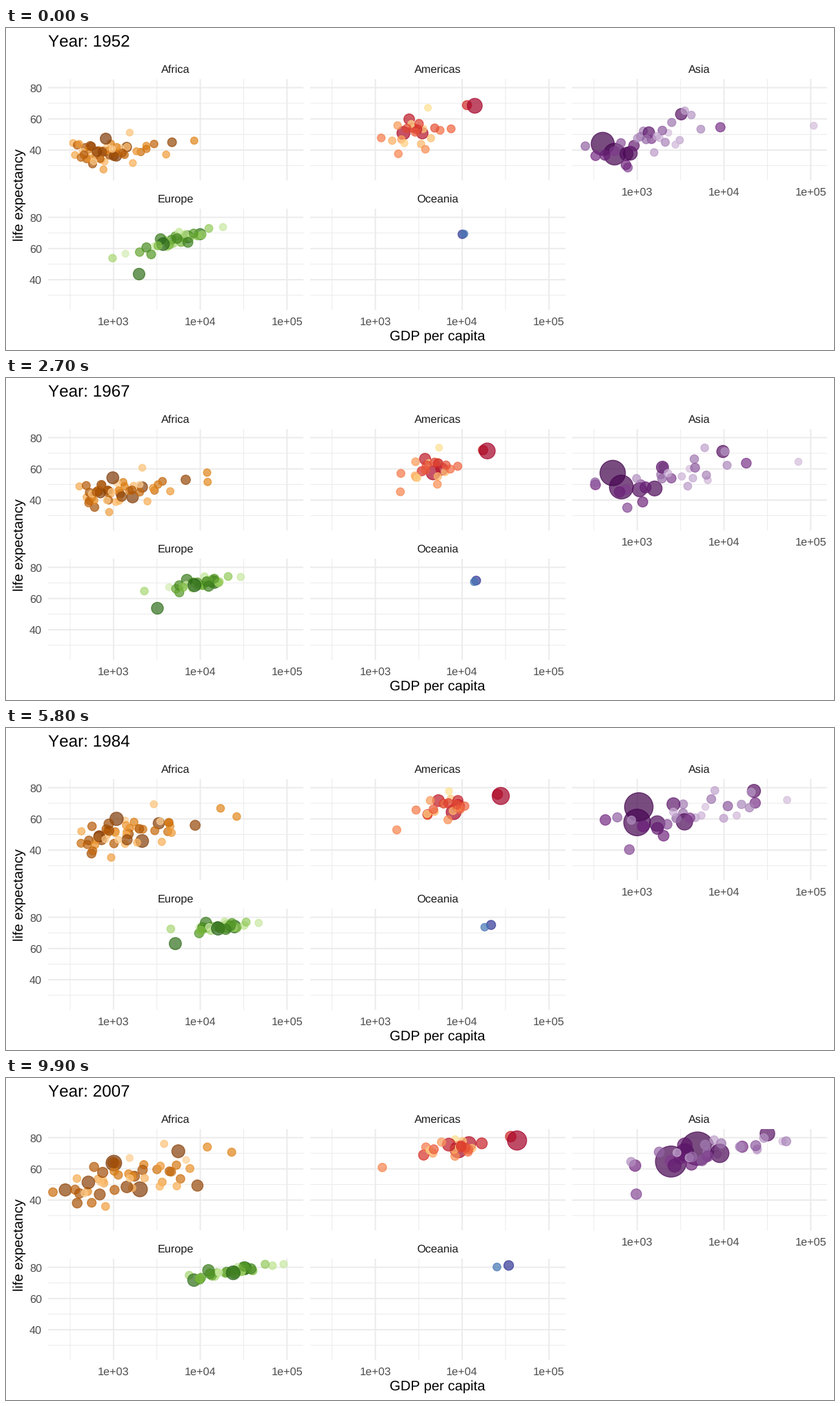
Write a matplotlib script that moves like this. It is 1200x467 px and loops after 10000 ms.

```python
import numpy as np
import matplotlib.pyplot as plt
from matplotlib.animation import FuncAnimation
from matplotlib.colors import LinearSegmentedColormap, to_rgba

W, H, DPI = 1200, 467, 100
FRAMES, INTERVAL = 100, 100
FIRST, MID, LAST = 1952, 1977, 2007
PX_PER_PT = 1.84          # scale of the plot theme's points on the stage
PT = 72 / DPI             # stage pixel in matplotlib points
PANEL_W, PANEL_H = 369.6, 146.8
COLS, ROWS = (61.4, 440.9, 820.4), (74, 262)
X_RANGE, Y_RANGE = (2.2487, 5.1887), (20.649, 85.553)

plt.rcParams.update({
    "font.family": ["Liberation Sans", "DejaVu Sans"],
    "text.hinting": "none",
    "text.kerning_factor": 6,   # plain glyph advances
})
fig = plt.figure(figsize=(W / DPI, H / DPI), dpi=DPI, facecolor="white")


def label(x, y, text, size=8.8, color="black", ha="center", **kw):
    """Text with its baseline at stage pixel (x, y); size in theme points."""
    return fig.text(x / W, 1 - y / H, text, color=color, ha=ha, va="baseline",
                    fontsize=size * PX_PER_PT * PT, **kw)


def panel(name, col, row, x_axis=False):
    left, top = COLS[col], ROWS[row]
    ax = fig.add_axes([left / W, 1 - (top + PANEL_H) / H, PANEL_W / W, PANEL_H / H])
    ax.set(xlim=X_RANGE, ylim=Y_RANGE)
    ax.axis("off")
    for xs, ys, width in (((2.5, 3.5, 4.5), (30, 50, 70), 0.98),
                          ((3, 4, 5), (40, 60, 80), 1.96)):
        style = dict(color="#EBEBEB", lw=width * PT, snap=False, zorder=0)
        for x, y in zip(xs, ys):
            ax.axvline(x, **style)
            ax.axhline(y, **style)

    label(left + PANEL_W / 2, top - 9, name, color="#1A1A1A")
    if col == 0:
        for y in (40, 60, 80):
            py = top + PANEL_H * (Y_RANGE[1] - y) / (Y_RANGE[1] - Y_RANGE[0])
            label(52, py + 5.9, str(y), color="#4D4D4D", ha="right")
    if x_axis:
        for x in (3, 4, 5):
            px = left + PANEL_W * (x - X_RANGE[0]) / (X_RANGE[1] - X_RANGE[0])
            label(px, top + PANEL_H + 21.8, f"1e+0{x}", color="#4D4D4D")
    return ax


def curve(keys, year):
    """Parabola through the values at the first, middle and last year."""
    a, b, c = keys
    t, m, n = year - FIRST, MID - FIRST, LAST - FIRST
    return (a * (t - m) * (t - n) / (m * n)
            + b * t * (t - n) / (m * (m - n))
            + c * t * (t - m) / (n * (n - m)))


def bell(rng, n):
    """Evenly spread, bell-shaped scores in random order."""
    p = (np.arange(n) + 0.5) / max(n, 1)
    return rng.permutation(0.55 * np.log(p / (1 - p)))


class Crowd:
    """Bubbles of one panel: a few leaders on set paths and a random swarm.

    leaders: rows of last population (millions), gdp x3, life expectancy x3.
    trend: per key year, mean and spread of log10 gdp, mean life,
           life gained per decade of gdp, and spread around that line.
    """

    def __init__(self, ax, ramp, growth, leaders, n=0, trend=None, median=9,
                 spread=1.2, skew=0.0, cut=0.9, seed=0):
        rng = np.random.default_rng(seed)
        rows = np.array(leaders, float).T
        self.lead_x, self.lead_y = np.log10(rows[1:4]), rows[4:7]
        self.trend = None if trend is None else np.array(trend)
        wealth = bell(rng, n)
        self.wealth = wealth + skew * (wealth ** 2 - 1)
        self.wealth_turn, self.health, self.health_turn = (bell(rng, n) for _ in range(3))
        self.pop = np.append(rows[0], median * np.exp(spread * bell(rng, n)))
        self.growth = growth

        total = len(self.pop)
        cmap = LinearSegmentedColormap.from_list("ramp", ramp.split(), N=512)
        rank = np.argsort(np.argsort(-self.pop))
        colors = [to_rgba(c, 0.7) for c in cmap(cut * rank / (total - 1))]
        self.dots = ax.scatter(np.zeros(total), np.zeros(total), c=colors,
                               edgecolors=colors, linewidths=1.3 * PT, zorder=3)

    def show(self, year):
        done = (year - FIRST) / (LAST - FIRST)
        x, y = curve(self.lead_x, year), curve(self.lead_y, year)
        if self.trend is not None:
            mean, sd, life, slope, noise = curve(self.trend, year)
            # scores slowly trade places while the cloud keeps its shape
            c, s = np.cos(0.8 * done), np.sin(0.8 * done)
            dx = sd * (c * self.wealth + s * self.wealth_turn)
            dy = slope * dx + noise * (c * self.health + s * self.health_turn)
            x = np.append(x, mean + dx)
            y = np.append(y, np.minimum(life + dy, 82))
        pop = self.pop * self.growth ** (done - 1)
        size = 2 + 10 * np.sqrt(np.clip(pop / 1319, 0, 1))
        diameter = 0.75 * (size * 2.845 + 0.945) * PX_PER_PT
        self.dots.set_offsets(np.column_stack([x, y]))
        self.dots.set_sizes((diameter * PT) ** 2)


crowds = [
    Crowd(panel("Africa", 0, 0), "#7F3B08 #B35806 #E08214 #FDB863 #FEE0B6", 3.9,
          leaders=[(64.6, 781, 796, 278, 39.1, 47.8, 46.5),
                   (80.3, 1419, 2785, 5581, 41.9, 53.3, 71.3),
                   (6.0, 2388, 21951, 12057, 42.7, 57.4, 74.0),
                   (135, 1077, 1982, 2014, 36.3, 44.5, 46.9),
                   (44, 4725, 8029, 9270, 45.0, 55.5, 49.3)],
          n=47, trend=[(2.94, .28, 39, 4, 4.5),
                       (3.10, .30, 49, 11, 5),
                       (3.16, .40, 54.5, 12, 6.5)],
          median=7, spread=1.25, skew=0.2, seed=4),
    Crowd(panel("Americas", 1, 0), "#A50026 #D73027 #F46D43 #FDAE61 #FEE090", 2.3,
          leaders=[(190, 2109, 6660, 9066, 50.9, 61.5, 72.4),
                   (33.4, 11367, 22091, 36319, 68.8, 74.2, 80.7),
                   (8.5, 1840, 1874, 1202, 37.6, 49.9, 60.9),
                   (109, 3478, 7675, 11978, 50.8, 65.0, 76.2),
                   (301, 13990, 24073, 42952, 68.4, 73.4, 78.2)],
          n=20, trend=[(3.47, .20, 52, 15, 6.5),
                       (3.73, .17, 65, 16, 4.5),
                       (3.90, .22, 73.5, 5, 2.5)],
          median=8.5, spread=1.1, cut=1, seed=7),
    Crowd(panel("Asia", 2, 0, x_axis=True),
          "#40004B #762A83 #9970AB #C2A5CF #E7D4E8", 2.6,
          leaders=[(31.9, 779, 786, 975, 28.8, 38.4, 43.8),
                   (1319, 400, 741, 4959, 44.0, 64.0, 73.0),
                   (1110, 547, 813, 2452, 37.4, 54.2, 64.7),
                   (223, 750, 1383, 3541, 37.5, 52.7, 70.6),
                   (127, 3217, 16610, 31656, 63.0, 75.4, 82.6),
                   (2.5, 108382, 59265, 47307, 55.6, 69.3, 77.6),
                   (47.8, 331, 371, 944, 36.3, 56.1, 62.1)],
          n=26, trend=[(3.18, .36, 47.5, 13, 6),
                       (3.55, .48, 60.5, 12, 5.5),
                       (3.84, .48, 71, 10.5, 3.5)],
          median=18, spread=1.25, seed=11),
    Crowd(panel("Europe", 0, 1, x_axis=True),
          "#276419 #4D9221 #7FBC41 #B8E186 #E6F5D0", 1.4,
          leaders=[(4.6, 974, 3528, 7446, 53.8, 69.9, 74.9),
                   (82.4, 7144, 20513, 32170, 67.5, 72.5, 79.4),
                   (71.2, 1969, 4269, 8458, 43.6, 59.5, 71.8),
                   (60.8, 9980, 17429, 33203, 69.2, 72.8, 79.4)],
          n=26, trend=[(3.70, .26, 65, 15, 2.2),
                       (4.15, .17, 72.3, 6, 1.6),
                       (4.36, .23, 77.3, 9, 1.2)],
          median=8.5, spread=1.15, seed=3),
    Crowd(panel("Oceania", 1, 1, x_axis=True), "#313695 #4575B4", 2.2, cut=1,
          leaders=[(20.4, 10040, 18334, 34435, 69.1, 73.5, 81.2),
                   (4.1, 10557, 16234, 25185, 69.4, 72.2, 80.2)]),
]

title = label(61, 28, "", size=13.2, ha="left")
label(625.5, 453, "GDP per capita", size=11)
label(25, 242, "life expectancy", size=11, rotation=90, rotation_mode="anchor")


def update(frame):
    year = FIRST + (LAST - FIRST) * frame / (FRAMES - 1)
    title.set_text(f"Year: {round(year)}")
    for crowd in crowds:
        crowd.show(year)


anim = FuncAnimation(fig, update, frames=FRAMES, interval=INTERVAL,
                     init_func=lambda: update(0), repeat=True, repeat_delay=0,
                     blit=False)
plt.show()
```
